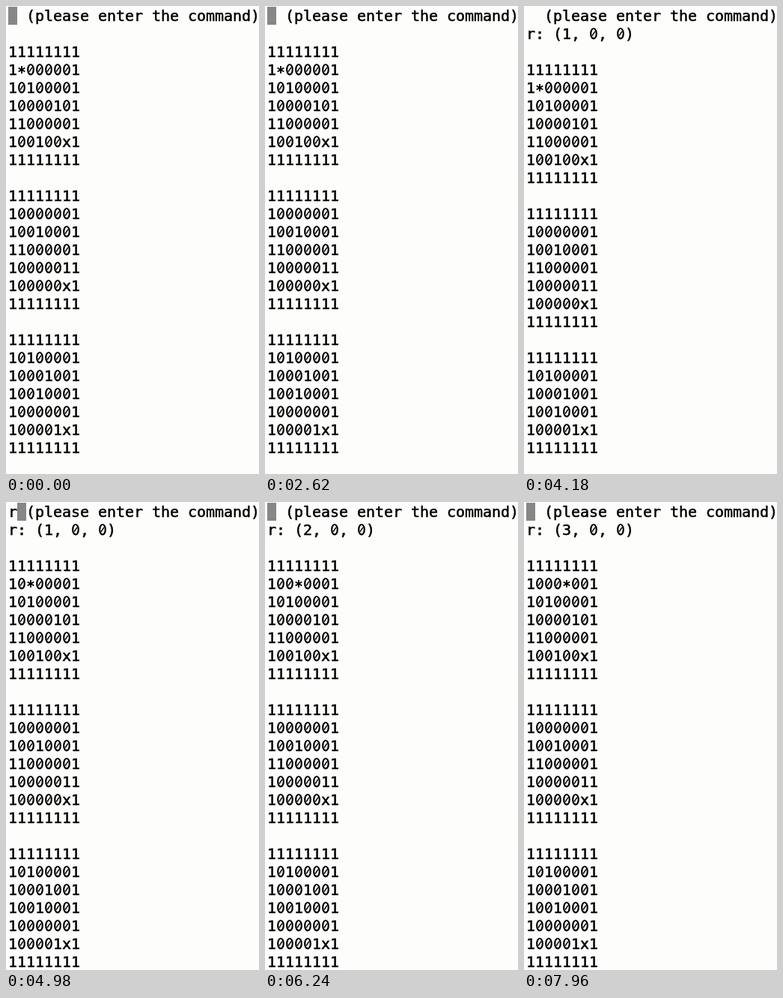
Animation of 338x624 px, one loop 8 s. Source, as an HTML page with a canvas:

```html
<!DOCTYPE html>
<html lang="en">
<head>
<meta charset="utf-8">
<title>Text maze</title>
<style>
  html, body { margin: 0; width: 338px; height: 624px; overflow: hidden; background: #fdfdfc; }
  canvas { display: block; }
</style>
</head>
<body>
<canvas id="screen" width="338" height="624"></canvas>
<script>
const ctx = document.getElementById('screen').getContext('2d');
const LOOP = 8000;
const CELL = 12, LINE = 24, LEFT = 3, TOP = 1;
const PAPER = '#fdfdfc', INK = '#000', CURSOR = '#878787';
const PROMPT = '(please enter the command)';

const FLOORS = [
  ['11111111', '10000001', '10100001', '10000101', '11000001', '100100x1', '11111111'],
  ['11111111', '10000001', '10010001', '11000001', '10000011', '100000x1', '11111111'],
  ['11111111', '10100001', '10001001', '10010001', '10000001', '100001x1', '11111111'],
];

// Each step lists only what changes; cursor -1 means hidden.
const STEPS = [
  { at: 0, typed: '', cursor: 0, player: 0, status: null, short: false },
  { at: 3300, typed: 'r', cursor: 1 },
  { at: 4040, typed: '', cursor: -1, status: 1, short: true },
  { at: 4280, cursor: 0, player: 1, short: false },
  { at: 4880, typed: 'r', cursor: 1 },
  { at: 5820, typed: '', cursor: -1, status: 2, short: true },
  { at: 6000, cursor: 0, player: 2, short: false },
  { at: 6440, typed: 'r', cursor: 1 },
  { at: 7380, typed: '', cursor: -1, status: 3 },
  { at: 7520, cursor: 0, player: 3 },
];

function stateAt(time) {
  return Object.assign({}, ...STEPS.filter(step => step.at <= time));
}

function screenLines(state) {
  const lines = [state.typed.padEnd(2) + PROMPT];
  if (state.status !== null) lines.push(`r: (${state.status}, 0, 0)`);
  FLOORS.forEach((floor, level) => {
    const rows = [...floor];
    if (level === 0) {
      const x = state.player + 1;
      rows[1] = rows[1].slice(0, x) + '*' + rows[1].slice(x + 1);
    }
    // The line is still missing while the view scrolls down.
    if (level === 2 && state.short) rows.splice(4, 1);
    lines.push('', ...rows);
  });
  return lines;
}

function stroke(width, path) {
  ctx.lineWidth = width;
  ctx.beginPath();
  path();
  ctx.stroke();
}

function line(x1, y1, x2, y2) {
  ctx.moveTo(x1, y1);
  ctx.lineTo(x2, y2);
}

// Zero with a rising slash.
function drawZero(x, y) {
  stroke(2.2, () => ctx.ellipse(x + 6, y - 7.3, 3.8, 6.7, 0, 0, 2 * Math.PI));
  stroke(1.5, () => line(x + 4.2, y - 4.4, x + 7.8, y - 10.2));
}

// Six-armed star centred on the digits.
function drawStar(x, y) {
  stroke(1.8, () => {
    for (let arm = 0; arm < 3; arm++) {
      const angle = Math.PI / 2 + arm * Math.PI / 3;
      const dx = 5 * Math.cos(angle), dy = 5 * Math.sin(angle);
      line(x + 6 - dx, y - 7 - dy, x + 6 + dx, y - 7 + dy);
    }
  });
}

function drawChar(char, x, y) {
  if (char === '0') return drawZero(x, y);
  if (char === '*') return drawStar(x, y);
  ctx.lineWidth = 0.5;
  ctx.fillText(char, x, y);
  ctx.strokeText(char, x, y);
}

function drawLine(text, row) {
  const baseline = TOP + row * LINE + 19;
  [...text].forEach((char, col) => drawChar(char, LEFT + col * CELL, baseline));
}

function draw(time) {
  const state = stateAt(time);
  ctx.fillStyle = PAPER;
  ctx.fillRect(0, 0, 338, 624);
  if (state.cursor >= 0) {
    ctx.fillStyle = CURSOR;
    ctx.fillRect(LEFT + state.cursor * CELL, TOP, CELL, LINE);
  }
  ctx.fillStyle = ctx.strokeStyle = INK;
  ctx.lineJoin = 'round';
  ctx.font = '20px "DejaVu Sans Mono", monospace';
  ctx.textBaseline = 'alphabetic';
  screenLines(state).forEach(drawLine);
}

const start = performance.now();
function tick() {
  draw((performance.now() - start) % LOOP);
  requestAnimationFrame(tick);
}
tick();
</script>
</body>
</html>
```
